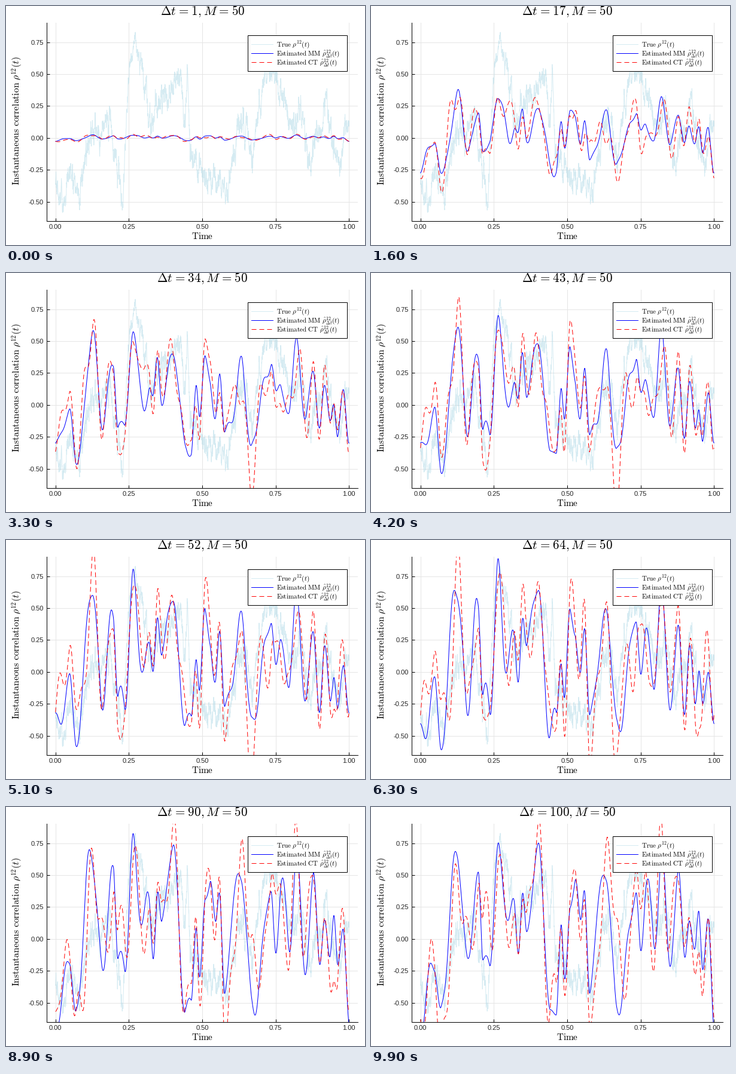
A matplotlib script for the animation above (10000 ms loop, 600 px wide and 400 px high).

```python
import numpy as np
import matplotlib.pyplot as plt
from matplotlib.animation import FuncAnimation
from matplotlib.patches import Rectangle

plt.rcParams.update({
    "mathtext.fontset": "cm",
    "font.family": "Liberation Sans",
    "lines.scale_dashes": False,
})

DPI, FRAMES, STEP = 100, 100, 100
PX = 72 / DPI
DASH = (0, (8 * PX, 5 * PX))
t = np.linspace(0, 1, 1201)

# Main turns of the slow process and of its smooth estimate
PATH = [
    (0, -.36), (.027, -.55), (.05, -.2), (.08, -.5), (.12, .05), (.19, .08),
    (.23, -.5), (.252, .6), (.272, .8), (.325, .1), (.4, .44), (.428, .42),
    (.44, .08), (.449, .5), (.46, -.1), (.52, -.33), (.59, -.38), (.632, .18),
    (.672, -.12), (.712, .5), (.765, .38), (.805, .1), (.835, .25),
    (.87, -.2), (.922, .25), (.968, -.2), (1, .15)]
TURNS = [
    (0, -.6), (.048, -.1), (.07, -.65), (.126, .72), (.16, -.24), (.197, .5),
    (.213, -.25), (.235, -.2), (.265, .8), (.3, .07), (.319, .34), (.333, 0),
    (.348, .45), (.362, .1), (.402, .72), (.442, -.5), (.462, -.48),
    (.479, .16), (.491, -.25), (.51, .45), (.526, .42), (.545, 0), (.559, .37),
    (.577, -.45), (.634, .5), (.668, -.52), (.734, .4), (.75, -.02),
    (.768, .38), (.795, -.08), (.821, .75), (.85, -.18), (.878, .45),
    (.899, -.18), (.916, .28), (.935, -.12), (.948, .16), (.962, -.3),
    (.98, .06), (1, -.6)]


def ease_through(points):
    """Smooth curve that is level at every point."""
    x, y = np.array(points).T
    i = np.clip(np.searchsorted(x, t, side="right") - 1, 0, len(x) - 2)
    s = (t - x[i]) / (x[i + 1] - x[i])
    return y[i] + (y[i + 1] - y[i]) * s * s * (3 - 2 * s)


def true_path(seed=12, n=3001):
    rng = np.random.default_rng(seed)
    x = np.linspace(0, 1, n)
    noise = np.zeros(n)
    for k in range(1, n):
        noise[k] = 0.9 * noise[k - 1] + rng.normal(0, 0.032)
    y = np.interp(x, *np.array(PATH).T)
    return x, np.clip(y + noise * (1 - 0.6 * y * y), -0.62, 0.875)


class Wobble:
    """Band-limited random wave that drifts as the step size grows."""

    def __init__(self, seed, n=27):
        rng = np.random.default_rng(seed)
        k = np.arange(1, n + 1)[:, None]
        phase = rng.uniform(0, 2 * np.pi, (n, 1))
        self.waves = np.cos(2 * np.pi * k * t + phase) * 2 / np.sqrt(n)
        self.rate = rng.uniform(0.02, 0.07, n)
        self.start = rng.uniform(0, 2 * np.pi, n)

    def at(self, step):
        return np.cos(self.rate * step + self.start) @ self.waves


base = ease_through(TURNS)
mm_wobble, ct_wobble = Wobble(3), Wobble(8)


def estimate(step, wobble, share):
    gain = 1 - np.exp(-step / 30)
    return gain * (base + share * wobble.at(step))


fig = plt.figure(figsize=(6, 4), dpi=DPI, facecolor="white")

# Plot area
L, R, T, B = 68, 588, 28, 360
ax = fig.add_axes([L / 600, 1 - B / 400, (R - L) / 600, (B - T) / 400])
ax.set(xlim=(-0.03, 1.03), ylim=(-0.65, 0.902),
       xticks=np.arange(5) / 4, yticks=np.arange(-2, 4) / 4)
ax.xaxis.set_major_formatter("{x:.2f}")
ax.yaxis.set_major_formatter(lambda v, _: f"{v:.2f}")
ax.set_axisbelow(True)
ax.grid(color="#e5e5e5", lw=PX)
ax.tick_params(direction="in", length=5 * PX, width=PX, labelsize=8,
               labelcolor="#222222", pad=5 * PX)
ax.spines[["top", "right"]].set_visible(False)
for side in ("left", "bottom"):
    ax.spines[side].set_linewidth(PX)

ax.plot(*true_path(), color="lightblue", alpha=0.5, lw=PX)
mm_line, = ax.plot(t, base, color="blue", lw=PX)
ct_line, = ax.plot(t, base, color="red", lw=PX, ls=DASH)

# Labels and legend in stage pixels
top = fig.add_axes([0, 0, 1, 1])
top.set(xlim=(0, 600), ylim=(400, 0))
top.axis("off")


def label(x, y, s, size, ha="left", va="baseline", **kw):
    return top.text(x, y, s, fontsize=size, ha=ha, va=va, **kw)


title = label(328.5, 15, "", 15.2, "center")
label(328.5, 390, r"$\mathrm{Time}$", 11, "center")
label(30, 192.5, r"$\mathrm{Instantaneous\ correlation}\ \rho^{12}(t)$",
      11.2, "right", "center", rotation=90)

top.add_patch(Rectangle((404, 49), 166, 60, fc="white", ec="black", lw=PX))
HAT = r"\ \hat{\rho}^{12}_{\Delta t}(t)$"
rows = [
    (64, r"$\mathrm{True}\ \rho^{12}(t)$", dict(color="lightblue", alpha=0.5)),
    (79, r"$\mathrm{Estimated\ MM}" + HAT, dict(color="blue")),
    (94, r"$\mathrm{Estimated\ CT}" + HAT, dict(color="red", ls=DASH)),
]
for y, s, style in rows:
    top.plot([410, 446], [y, y], lw=PX, **style)
    label(452, y + 3.2, s, 8)

EQ = r"\hspace{0.08}=\hspace{0.08}"


def draw(i):
    step = i + 1
    mm_line.set_ydata(estimate(step, mm_wobble, 0.1))
    ct_line.set_ydata(estimate(step, ct_wobble, 0.22))
    title.set_text(rf"$\Delta t{EQ}{step}, M{EQ}50$")
    return mm_line, ct_line, title


anim = FuncAnimation(fig, draw, frames=FRAMES, interval=STEP,
                     repeat=True, repeat_delay=0)
plt.show()
```
